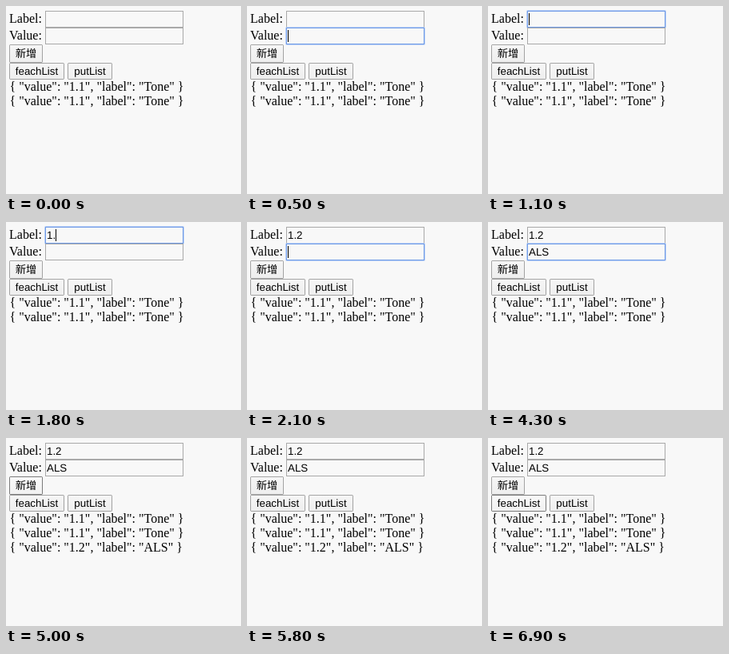
Write an HTML page that moves like this. It is 294x235 px and loops after 8 s.

```html
<!DOCTYPE html>
<html lang="en">
<head>
<meta charset="utf-8">
<title>Label and value form</title>
<style>
  html, body { margin: 0; width: 100%; height: 100%; overflow: hidden; background: #f8f8f8; }
  svg { display: block; width: 294px; height: 235px; }
  text { font: 16px "Liberation Serif", "Times New Roman", serif; white-space: pre; }
  .ui { font: 13.333px "Liberation Sans", Arial, "Noto Sans CJK TC", "Noto Sans CJK", sans-serif; text-rendering: geometricPrecision; }
  .box { fill: #f8f8f8; stroke: #a9a9a9; }
  .ring { fill: none; stroke: #b9d0f6; }
  .focus .box { stroke: #6f9ae6; }
  .field:not(.focus) .ring { display: none; }
  .button rect { fill: url(#face); stroke: #000; stroke-opacity: .333; }
  .button.hover rect { fill: url(#lit); stroke-opacity: .5; }
</style>
</head>
<body>
<svg viewBox="0 0 294 235">
  <defs>
    <linearGradient id="face" x2="0" y2="1"><stop stop-color="#f6f6f6"/><stop offset="1" stop-color="#eee"/></linearGradient>
    <linearGradient id="lit" x2="0" y2="1"><stop stop-color="#f9f9f9"/><stop offset="1" stop-color="#f1f1f1"/></linearGradient>
  </defs>
</svg>
<script>
const svg = document.querySelector('svg');

function add(tag, attrs, parent = svg, text = '') {
  const el = document.createElementNS('http://www.w3.org/2000/svg', tag);
  for (const key in attrs) el.setAttribute(key, attrs[key]);
  el.textContent = text;
  return parent.appendChild(el);
}

const show = (el, on) => el.setAttribute('visibility', on ? 'visible' : 'hidden');

function field(name, y, word, keys) {
  const g = add('g', { class: 'field' });
  add('text', { x: 4, y: y + 15 }, g, name);
  add('rect', { class: 'ring', x: 48.5, y: y - .5, width: 174, height: 22, rx: 1 }, g);
  add('rect', { class: 'box', x: 49.5, y: y + .5, width: 172, height: 20 }, g);
  const text = add('text', { class: 'ui', x: 51, y: y + 15 }, g);
  const caret = add('rect', { y: y + 3, width: 1, height: 15 }, g);
  return { g, text, caret, word, keys };
}

function button(name, x, y, width, height, baseline) {
  const g = add('g', { class: 'button' });
  add('rect', { x: x + .5, y: y + .5, width: width - 1, height: height - 1, rx: 1 }, g);
  add('text', { class: 'ui', x: x + width / 2, y: baseline, 'text-anchor': 'middle' }, g, name);
  return g;
}

const row = (y, value, label) =>
  add('text', { x: 4.5, y }, svg, `{ "value": "${value}", "label": "${label}" }`);

const fields = [
  field('Label:', 6, '1.2', [1700, 1800, 1900]),
  field('Value:', 27, 'ALS', [2900, 3200, 3800])
];
const buttons = [
  button('新增', 4, 48, 42, 23, 64),
  button('feachList', 4, 71, 69, 21, 86),
  button('putList', 77, 71, 56, 21, 86)
];
row(106, '1.1', 'Tone');
row(124, '1.1', 'Tone');
const newRow = row(142, '1.2', 'ALS');

// [time, index of the active element or -1]
const focuses = [[0, -1], [500, 1], [1100, 0], [2100, 1], [5000, -1]];
const hovers = [[0, -1], [4700, 0], [5800, -1], [6800, 2], [6900, 1]];
const latest = (list, t) => list.findLast(([time]) => time <= t);

function draw(t) {
  const [since, focus] = latest(focuses, t);
  const [, hover] = latest(hovers, t);
  fields.forEach(({ g, text, caret, word, keys }, i) => {
    const typed = keys.filter(time => time <= t);
    text.textContent = word.slice(0, typed.length);
    caret.setAttribute('x', 51 + Math.round(text.getComputedTextLength()));
    // The blink restarts with each focus or key
    const idle = t - Math.max(since, ...typed);
    show(caret, focus === i && idle % 900 < 500);
    g.classList.toggle('focus', focus === i);
  });
  buttons.forEach((b, i) => b.classList.toggle('hover', hover === i));
  show(newRow, t >= 5000);
}

const start = performance.now();
function tick() {
  draw((performance.now() - start) % 8000);
  requestAnimationFrame(tick);
}
tick();
</script>
</body>
</html>
```
